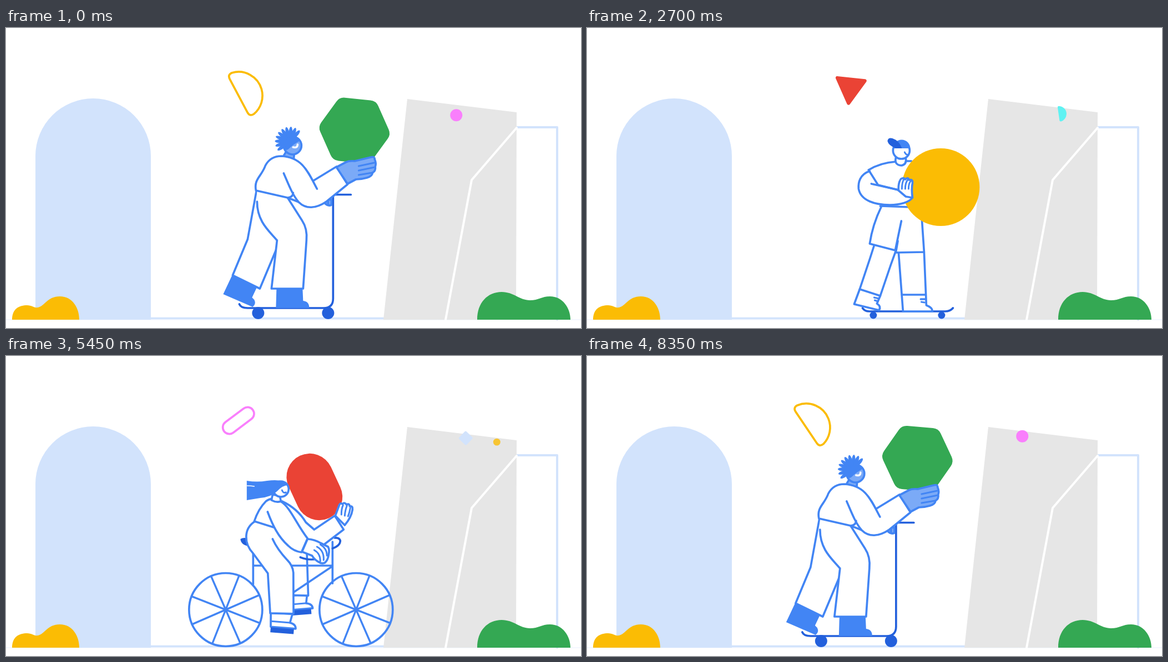
An HTML page with a canvas for the animation above (8400 ms loop, 1036 by 541 pixels).

```html
<!DOCTYPE html>
<html lang="en">
<head>
<meta charset="utf-8">
<title>On the move</title>
<style>
html, body { margin: 0; width: 100%; height: 100%; overflow: hidden; background: #fff; }
canvas { display: block; }
</style>
</head>
<body>
<canvas id="stage" width="1036" height="541"></canvas>
<script>
const ctx = document.getElementById('stage').getContext('2d');
const LOOP = 8400, SEAM = 50, TAU = Math.PI * 2;
const BLUE = '#4285f4', DARK = '#2360dc', SKIN = '#7baaf7', PALE = '#d2e3fc', GREY = '#e6e6e6';
const RED = '#ea4335', YELLOW = '#fbbc04', GREEN = '#34a853', PINK = '#f97ffc', CYAN = '#5ff2f2', WHITE = '#fff';

const rad = deg => deg * Math.PI / 180;
const lerp = (a, b, k) => a + (b - a) * k;
const clamp = v => Math.max(0, Math.min(1, v));
const smooth = (a, b, t) => { const k = clamp((t - a) / (b - a)); return k * k * (3 - 2 * k); };

// Piecewise linear through [t, v] knots, extended at both ends
function track(knots, t) {
  let i = 0;
  while (i < knots.length - 2 && t > knots[i + 1][0]) i++;
  const [a, va] = knots[i], [b, vb] = knots[i + 1];
  return lerp(va, vb, (t - a) / (b - a));
}

// Blend two path strings with the same commands
function mix(a, b, k) {
  const to = b.match(/-?[\d.]+/g);
  let i = 0;
  return a.replace(/-?[\d.]+/g, n => lerp(+n, +to[i++], k).toFixed(2));
}

function draw(d, fill, stroke, width = 3.7) {
  const p = typeof d === 'string' ? new Path2D(d) : d;
  if (fill) { ctx.fillStyle = fill; ctx.fill(p); }
  if (stroke) { ctx.strokeStyle = stroke; ctx.lineWidth = width; ctx.stroke(p); }
}
const line = (d, color = BLUE, width) => draw(d, null, color, width);
const shape = (d, fill = WHITE) => draw(d, fill, BLUE);

function disc(x, y, r, fill, stroke) {
  const p = new Path2D();
  p.arc(x, y, r, 0, TAU);
  draw(p, fill, stroke);
}

function at(x, y, deg, fn, s = 1) {
  ctx.save();
  ctx.translate(x, y);
  ctx.rotate(rad(deg));
  ctx.scale(s, s);
  fn();
  ctx.restore();
}

function polygon(n, r, round, deg) {
  const p = new Path2D();
  const pt = i => [r * Math.cos(rad(deg) + i * TAU / n), r * Math.sin(rad(deg) + i * TAU / n)];
  const [a, b] = [pt(0), pt(1)];
  p.moveTo((a[0] + b[0]) / 2, (a[1] + b[1]) / 2);
  for (let i = 1; i <= n; i++) p.arcTo(...pt(i), ...pt(i + 1), round);
  p.closePath();
  return p;
}

function halfDisc(r, c) {
  const p = new Path2D(), a = Math.acos(c / r), o = -r * 0.4;
  p.moveTo(o, r - c);
  p.lineTo(o, c - r);
  p.quadraticCurveTo(o, -r, o + c, -r * Math.sin(a));
  p.arc(o, 0, r, -a, a);
  p.quadraticCurveTo(o, r, o, r - c);
  p.closePath();
  return p;
}

function capsule(len, r) {
  const p = new Path2D(), h = len / 2;
  p.arc(h, 0, r, -TAU / 4, TAU / 4);
  p.arc(-h, 0, r, TAU / 4, TAU * 3 / 4);
  p.closePath();
  return p;
}

/* ---------- scenery ---------- */
function backdrop() {
  ctx.fillStyle = WHITE;
  ctx.fillRect(0, 0, 1036, 541);
  line('M0 526H1036', '#e8f0fe', 1);
  draw('M53 526V231A104 104 0 0 1 261 231V526Z', PALE);
  line('M261 523.5H681', PALE, 3.5);
  line('M919 179H993V526', PALE, 4);
  draw('M723 128L920 152L919 526H680Z', GREY);
  line('M920 180L839 274L792 526', WHITE, 4);
}

function bushes() {
  draw('M11 526C11 506 24 500 38 500C47 500 50 505 57 504C70 502 74 484 97 484C120 484 132 505 132 526Z', YELLOW);
  draw('M849 526C849 495 868 476 893 476C915 476 925 491 944 491C960 491 965 484 980 484C1003 484 1017 505 1017 526Z', GREEN);
}

/* ---------- floating shapes ---------- */
const drops = [
  { a: [-100, 409, 117], b: [0, 434, 115], rot: -34, spin: 60, paint: () => line(halfDisc(43, 9), YELLOW) },
  { a: [-100, 784, 147], b: [0, 811, 153], speed: .3, still: 1, paint: () => disc(0, 0, 11, PINK) },
  { a: [1850, 588.5, 101], b: [2700, 855, 154], rot: 77, spin: -100, paint: () => draw(halfDisc(22, 4), CYAN) },
  { a: [2700, 474, 107], b: [3850, 836, 151], rot: 96, spin: 99, paint: () => draw(polygon(3, 35, 3, 0), RED) },
  { a: [3850, 344.5, 123.5], b: [5450, 828, 148], rot: 30, spin: 65, paint: () => draw(polygon(4, 18, 3, 45), PALE) },
  { a: [3850, 401, 113], b: [5450, 884, 155], still: 1, paint: () => disc(0, 0, 6.4, YELLOW) },
  { a: [5450, 418.5, 116.5], b: [6600, 749.5, 127.5], rot: -37, spin: 69.5, paint: () => line(capsule(41, 11.8), PINK) }
];

function floaters(t, u) {
  for (const d of drops) {
    const now = d.a[0] < 0 ? u : t;
    const [t0, x0, y0] = d.a, [t1, x1, y1] = d.b;
    const before = now < t0 && d.speed;
    const x = before ? x0 + (now - t0) * d.speed : lerp(x0, x1, (now - t0) / (t1 - t0));
    const alpha = Math.min(clamp((x - 260) / 50), clamp((920 - x) / 45));
    if (!alpha) continue;
    const y = t0 < 0 ? 100 + (x < 600 ? 0.00066 : 0.00107) * (x - 580) ** 2
      : lerp(y0, y1, (x - x0) / (x1 - x0)) + 0.0007 * (x - x0) * (x - x1);
    const s = d.still ? 1 : 1 - clamp((x - 755) / 285);
    ctx.globalAlpha = alpha;
    at(x, y, (d.rot || 0) + (d.spin || 0) * (now - t0) / 1000, d.paint, s);
    ctx.globalAlpha = 1;
  }
}

/* ---------- scooter rider ---------- */
const scootX = [[-1850, -648], [-100, -32.5], [0, 0], [1000, 345]];

function scooter(u) {
  at(track(scootX, u), 0, 0, () => {
    line('M586 300.5H621M589 301V488Q589 505 572 505H435Q423 505 420 498', DARK);
    disc(454, 514, 11, DARK);
    disc(580, 514, 11, DARK);
    shape('M574 316Q578 309 586 309V319Q580 322 574 316ZM580 312V319', SKIN);

    draw('M407 446L391 480L444 503Q451 498 447 490Q444 487 443 486L452 467Z', BLUE);
    shape('M451 293L435 381L408 446L457 470L488 396L490 340');
    draw('M487 470H534L535 492Q546 493 546 505H486Z', BLUE);
    draw('M452 293L507 306L533 347Q543 362 541 383L535 470H478L488 383C475 367 452 350 452 313Z', WHITE);
    line('M507 306L533 347Q543 362 541 383L535 470H478L488 383C475 367 452 350 452 313M507 306L530 315');

    shape('M505 222L499 232Q508 239 518 237L519 226Z', SKIN);
    draw('M450 293C446 272 460 268 467 248Q476 231 496 231C530 233 542 255 556 275L595 250L615 282L577 313C555 328 537 325 523 311L517 297Q516 305 507 306Z', WHITE);
    line('M517 297Q517 305 507 306L450 293C446 272 460 268 467 248Q476 231 496 231C534 233 544 260 560 290');
    line('M500 262C508 280 515 300 527 314C540 327 558 326 577 313L615 282L595 250L554 275');

    at(627.5, 185, 6 + 2 * Math.sin(u / 180), () => draw(polygon(6, 66, 17, 0), GREEN));
    shape('M595 251L612 242Q618 239 628 240L657 233Q664 231 664 237Q667 244 665 250Q666 258 660 261Q660 267 650 270Q640 273 630 273L615 281Z', SKIN);
    line('M635 249L663 243M635 257L664 251M635 265L659 261', BLUE, 3);

    disc(516, 212, 16, SKIN, BLUE);
    draw('M499 215Q497 198 513 195Q528 195 530 203Q518 209 508 219Q501 222 499 215Z', BLUE);
    for (let i = 0; i < 10; i++) {
      at(511, 205, 145 + i * 18.5, () => {
        ctx.fillStyle = BLUE;
        ctx.beginPath();
        ctx.ellipse(16.5, 0, 10.5, 3.3, 0, 0, TAU);
        ctx.fill();
      });
    }
    line('M517 215Q525 217 525 210', WHITE, 3.5);
  });
}

/* ---------- skateboarder ---------- */
const skateX = [[1000, -30], [1850, 246], [2700, 515], [3850, 942]];
const skatePhase = [[450, -0.5], [1850, 0.5], [2700, 1], [3850, 2]];

function skater(t) {
  const k = (1 + Math.cos(TAU * track(skatePhase, t))) / 2;
  const limb = (a, b) => mix(a, b, k);
  at(track(skateX, t) - 515, 0, 0, () => {
    line('M496 505Q500 511 508 511H645Q654 511 659 505', DARK);
    disc(515.5, 518, 6.5, DARK);
    disc(638.5, 518, 6.5, DARK);

    // standing leg
    shape(limb('M570 404L569 511L623 511Q623 506 612 503L600 404', 'M561 405L569 511L622 511Q622 504 611 500L607 404'));
    line(limb('M570 482L613 482M604 495L612 495', 'M567 481L609 481M601 489L609 489'));
    line(limb('M606 499L612 499', 'M602 494L608 495'), BLUE, 3);
    shape(limb('M590 330L560 403L607 403L612 335', 'M566 348L556 405L607 404L603 345'));

    // kicking leg
    shape(limb('M575 393L583 405L583 464L581 492L630 492Q630 486 622 484L623 462L620 395L614 376',
      'M517 392L509 417L491 471L481 498L526 509Q530 502 522 497L528 483L547 427L556 402'));
    line(limb('M583 464L623 462', 'M491 471L528 483'));
    line(limb('M614 470L622 470M615 476L622 476', 'M517 486L526 488M518 491L524 493'), BLUE, 3);
    draw(limb('M550 316L610 316L612 342L592 360Z', 'M531 322L601 322L602 346L558 386Z'), WHITE);
    shape(limb('M547 316Q530 352 570 395L611 373L592 330', 'M530 322Q514 355 509 389L555 401L566 348'));

    at(20 * (1 - k), -6 * (1 - k) + 8 * smooth(2700, 3850, t), 0, () => {
      draw('M507 256Q530 241 556 241H584V323L530 321L524 284Z', WHITE);
      line('M528 321L582 323M584 240H575M556 241Q528 243 507 256');
      shape('M556 234Q553 247 566 248Q576 246 574 235');
      disc(566, 221, 15, WHITE, BLUE);
      draw('M551 217A15.5 15.5 0 0 1 582 217Z', BLUE);
      draw('M541 204Q542 197 550 199Q562 203 567 217H556Q543 212 541 204Z', DARK);
      line('M572 224Q574 229 579 229', BLUE, 3);
      disc(637, 287, 70, YELLOW);
      shape('M509 258C491 264 488 279 489 290C493 312 520 319 545 319C565 319 580 314 586 306L583 292L560 292L524 283L507 256Z');
      line('M561 292L512 281');
      shape('M561 293C560 280 564 271 568 271Q571 270 573 273Q578 268 580 274Q587 272 586 280Q584 290 586 306L574 304Z');
      line('M567 290Q567 278 571 272M573 290Q573 279 578 273M579 290Q579 280 583 276', BLUE, 3);
    });
  });
}

/* ---------- cyclist ---------- */
const rideX = [[3850, 144], [5450, 630], [6600, 988.7]];
const pedal = [[3850, 220], [5450, 489], [6600, 662]];

// Two-bone leg from the hip to a pedal at the given angle
function leg(deg, near) {
  const hx = 452, hy = 328, thigh = 69, shin = 80;
  const cx = 510 + 21 * Math.cos(rad(deg)), cy = 447.5 + 21 * Math.sin(rad(deg));
  const d = Math.min(Math.hypot(cx - hx, cy - hy), thigh + shin);
  const bend = Math.acos((thigh ** 2 + d * d - shin ** 2) / (2 * thigh * d));
  const a = Math.atan2(cy - hy, cx - hx) - bend;
  const kx = hx + thigh * Math.cos(a) + 2, ky = hy + thigh * Math.sin(a);
  at(cx, cy, 6 * Math.sin(rad(deg)), () => {
    shape('M-20 0L-18 26L27 26Q27 18 16 16L19 0Z');
    line('M-18 16H16', BLUE, 3);
    draw('M-18 27H24V36H-18Z', DARK);
  });
  const outline = `M445 356L${kx - 23} ${ky + 8}L${cx - 21} ${cy}L${cx + 21} ${cy + 1}L${kx + 23} ${ky + 7}Q${kx + 22} ${ky - 6} ${kx + 12} ${ky - 16}`;
  const hip = `Q${lerp(480, kx, .6)} ${lerp(330, ky - 22, .6)} 480 330`;
  draw(outline + hip + 'L482 309L447 299C428 312 428 338 445 356Z', WHITE);
  line(near ? outline + hip + 'M447 299C428 312 428 338 445 356' : outline);
}

function wheel(x, deg) {
  disc(x, 457.5, 66, null, BLUE);
  at(x, 457.5, deg, () => {
    for (let i = 0; i < 4; i++) {
      ctx.rotate(TAU / 8);
      line('M-66 0H66', BLUE, 3.4);
    }
  });
}

function hand() {
  shape('M-15 5L-8 -14Q-6 -19 -2 -16Q2 -20 5 -15Q10 -18 11 -12Q17 -13 16 -6Q14 8 2 22Z');
  line('M-4 3Q-4 -8 -1 -14M2 5Q3 -6 6 -13M8 6Q11 -2 12 -9', BLUE, 3);
}

function cyclist(t) {
  const x = track(rideX, t), b = smooth(5450, 6600, t), turn = 33.8 + 0.9 * (x - 144), crank = track(pedal, t);
  at(x - 630, 0, 0, () => {
    leg(crank + 180, false);
    wheel(395.5, turn);
    wheel(630.5, turn);
    line('M445 412V345M445 378H588M588 410V335M588 379L518 426');
    line('M530 363Q545 369 560 366M588 347Q602 342 602 333Q600 327 592 328', DARK);
    draw('M422 330Q428 326 440 330L448 344Q423 344 422 330Z', DARK);
    leg(crank, true);

    at(lerp(555.5, 554.5, b), lerp(236, 254, b), lerp(65, 75, b), () => draw(capsule(40, 42), RED));

    // far arm
    shape(mix('M497 262Q525 275 540 300L555 313L592 288L608 313L570 342', 'M490 262Q515 275 528 308L541 326L580 313L588 340L560 352', b));
    at(lerp(608, 599, b), lerp(283, 311, b), 12 * b, hand);

    // torso and near arm
    draw('M447 298C452 283 460 270 468 262Q480 253 494 262C512 272 522 302 543 329L532 354Q518 352 508 342L482 309Z', WHITE);
    line('M482 309L447 298C452 283 460 270 468 262Q480 253 494 262C512 272 522 302 543 329L532 354Q518 352 508 342C490 326 480 305 471 281');
    shape('M543 330Q556 331 566 337L580 344Q583 350 581 358Q580 368 574 373Q568 375 564 372Q556 368 551 360L533 353Z');
    line('M560 344Q573 351 572 368M555 350Q566 356 566 370M566 340Q578 347 578 360', BLUE, 3);

    shape('M480 250L478 260Q487 265 495 262L493 252Z');
    disc(495, 240, 14, WHITE, BLUE);
    const w = 2 * b;
    draw(`M433.5 ${225 + w}Q452 ${228 - w} 470 225Q500 221 508 233Q498 233 488 244Q478 254 458 256L433.5 ${260 + w / 2}Z`, BLUE);
    line(`M434 ${234 + w}Q441 ${234 + w} 447 235`, WHITE, 1.5);
    line('M497 242Q499 248 504 246', BLUE, 3);
  });
}

function frame(now) {
  const t = now % LOOP;
  const u = t > LOOP / 2 ? t - LOOP - SEAM : t;
  ctx.lineCap = ctx.lineJoin = 'round';
  backdrop();
  ctx.save();
  ctx.clip(new Path2D('M53 541V231A104 104 0 0 1 157 127V0H991V541Z'));
  scooter(u);
  if (t < 4800) skater(t);
  if (t > 3000 && t < 8000) cyclist(t);
  ctx.restore();
  floaters(t, u);
  bushes();
  requestAnimationFrame(() => frame(performance.now() - start));
}
const start = performance.now();
frame(0);
</script>
</body>
</html>
```
